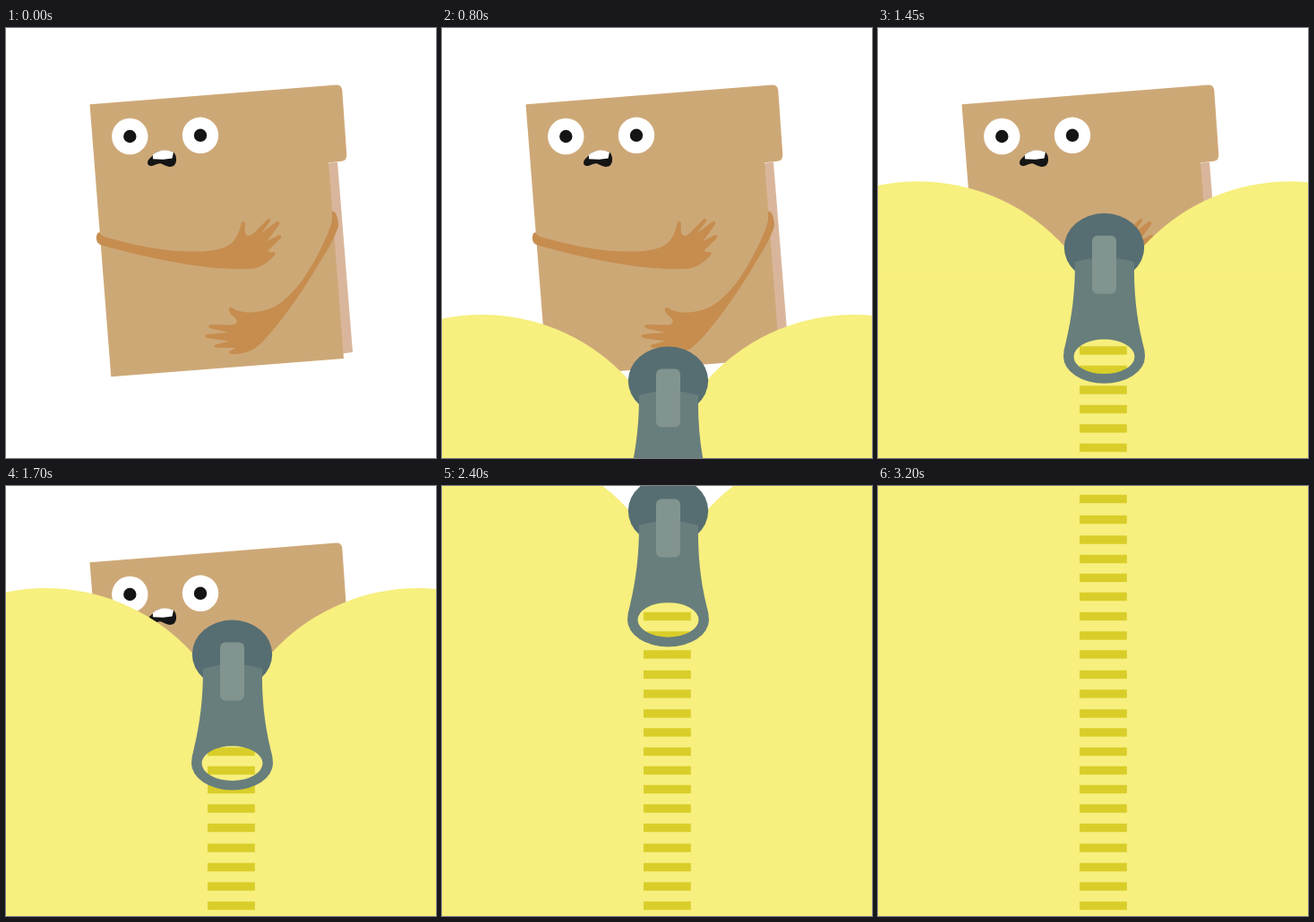
An HTML page that plays this animation: 480 by 480 pixels, repeating every 3.5 s.

```html
<!DOCTYPE html>
<html lang="en">
<head>
<meta charset="utf-8">
<title>Zipped up</title>
<style>
  html, body { margin: 0; width: 100%; height: 100%; overflow: hidden; background: #fff; }
  svg { display: block; width: 100vw; height: 100vh; }
  .arm { fill: #c68d4f; }
  .cloth { fill: #f7ef7e; }
  .ink { fill: #151515; }
  .white { fill: #fff; }
</style>
</head>
<body>
<svg viewBox="0 0 480 480">
  <defs>
    <!-- Teeth exist only below the middle of the slider -->
    <clipPath id="closed"><rect id="closedArea" width="480" height="1200"/></clipPath>
  </defs>

  <g id="folder">
    <path fill="#d9b69b" d="M358 151 L370 149.5 L387 362 L374 363.5Z"/>
    <path fill="#cda877" d="M93.5 85.3 L368.5 63.6 Q374.5 63.4 375.3 69.5 L380.3 141.5
      Q380.4 148.2 374.5 148.8 L360 150.3 L377 369 L117.3 389.3Z"/>

    <g class="white">
      <circle cx="138.3" cy="121" r="20.2"/>
      <circle cx="217" cy="119.8" r="20.2"/>
    </g>
    <g class="ink">
      <circle cx="138.3" cy="121" r="7.2"/>
      <circle cx="217" cy="119.8" r="7.2"/>
      <path d="M158 150.5 C158 146 163 144.5 165 140.5 C170 136.5 180 136 187 138.5
        C190.5 142 191.5 150 187.5 153.5 C183 156.5 178 154 174 151.8
        C169 150 166 154.5 161.5 154 C159 153.6 158 152.500 158 150.5Z"/>
    </g>
    <path class="white" d="M163.800 141.500 Q174 133.500 187 138.500 L185.500 145.500 L175.500 146.700 L164 146.300Z"/>

    <path class="arm" d="M101 236 C100.500 231 102.500 227 105 228.500 C105 231 109 233 115 234.500
      C145 243 175 249 205 249.500 C228 250 244 247 252 240 C259 233 261 225 262.500 218.500
      C263.500 215 267 215.500 267 219 C266.500 225 266 229 269 231.500
      C272 233 276 230 279 226.500 L291.500 213.700 C294 211.500 296 214 294.500 216.500
      L284.500 229.500 L301.500 216.500 C304.500 214.500 306.500 217.500 304.500 220 L291.500 238
      L303.500 231.500 C306.500 230 308.500 233 306 235.500 L292.500 248.500
      C295 251 297 250 299 249.700 C301.500 250 301 252.500 299.500 254
      C292 262 284 268.500 272 268.800 C230 271 170 260 107 242.500 C103.500 241.500 101.500 239.500 101 236Z"/>
    <path class="arm" d="M364 205 C368 203.500 371 212 371 221 C368 232 360 246 350 262
      C334 289 314 319 293 343 C283 354 276 361 266 362.500 C261 363.500 256 364 252 364
      C248.500 363.500 248.500 360.500 252 359.700 L256 357 L236 357
      C232 357 231.500 353.800 235 353.300 L249 349.500 L225.500 346.300
      C221.500 345.500 221.500 342 225.500 341.800 L249 340 L229 335.500
      C225 334.500 225.500 331 229.500 331 L251 331.500 C256 331.500 259.500 328.500 257 325
      C254 321.500 250 319.500 248.700 315 C248 311.800 251 311.300 253.500 313
      C263 319.500 284 319 300 311 C321 299 337 274 348 253 C356 238 361 226 364 215Z"/>
  </g>

  <g class="cloth" data-move>
    <circle cx="44.500" cy="449.500" r="221"/>
    <circle cx="460" cy="449.500" r="221"/>
    <rect y="338" width="480" height="1000"/>
  </g>

  <g id="teeth" fill="#d9ce29" clip-path="url(#closed)"></g>

  <g data-move>
    <ellipse cx="252.500" cy="302.300" rx="44.700" ry="38.300" fill="#566e72"/>
    <path fill="#687e7c" fill-rule="evenodd" d="M220 318.500 Q252.500 308.500 286 318.500
      C285.500 350 288 378 295.500 409 Q298 417 298 424 A45.500 30 0 0 1 207 424
      Q207 417 209.500 409 C217 378 220 350 220 318.500Z
      M218.500 424 A34 19.300 0 0 0 286.500 424 A34 19.300 0 0 0 218.500 424Z"/>
    <rect x="239" y="289" width="27" height="65" rx="6" fill="#82948f"/>
  </g>
</svg>
<script>
  const LOOP = 3500, STEP = 50;
  const SPEED = 0.2288;   // px per ms, upwards
  const REST = 1200;      // time at which the zip is drawn without a shift
  const TEETH = [14.5, 37.5, 60, 81.5, 102.5, 123.5, 145.5, 167, 188, 210.5, 232,
    254, 275, 296.5, 317.5, 338.5, 360, 381.5, 404, 425.5, 447, 468.5];

  document.getElementById('teeth').innerHTML = TEETH
    .map(y => `<rect x="225" y="${y - 4.7}" width="52.800" height="9.400"/>`).join('');

  const moving = document.querySelectorAll('[data-move]');
  const closedArea = document.getElementById('closedArea');

  function draw(time) {
    const t = Math.floor((time % LOOP) / STEP) * STEP;
    const shift = (REST - t) * SPEED;
    moving.forEach(part => part.setAttribute('transform', `translate(0 ${shift})`));
    closedArea.setAttribute('y', 325 + shift);
  }

  function tick() {
    draw(performance.now());
    requestAnimationFrame(tick);
  }
  tick();
</script>
</body>
</html>
```
